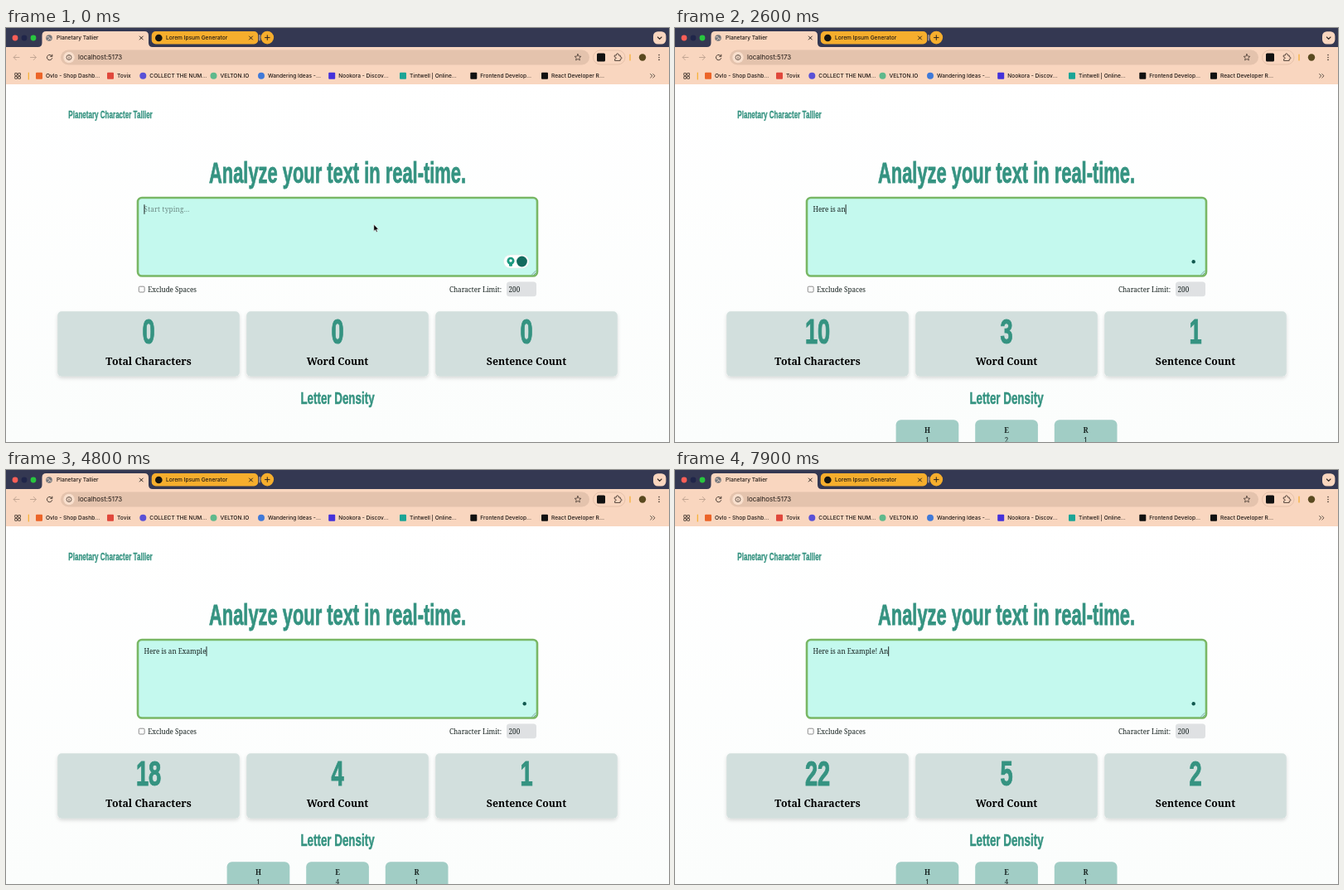
An HTML page for the animation above (8000 ms loop, 800x500 px).

```html
<!DOCTYPE html>
<html lang="en">
<head>
<meta charset="utf-8">
<title>Planetary Tallier</title>
<style>
html, body { margin: 0; width: 100%; height: 100%; overflow: hidden; background: #fff; }
svg { display: block; width: 800px; height: 500px; }
text { white-space: pre; }
.ui { font: 500 6.6px Inter, "Liberation Sans", sans-serif; fill: #1f1814; }
.url { font-size: 7.9px; font-weight: 400; }
.body { font: 8.1px "Noto Serif", "Liberation Serif", serif; fill: #16211f; }
.hint { fill: #6c8a84; letter-spacing: .25px; }
.label { font: 700 12.3px "Noto Serif", "Liberation Serif", serif; fill: #000; text-anchor: middle; }
.key { font: 700 8.6px "Noto Serif", "Liberation Serif", serif; fill: #16211f; text-anchor: middle; }
.display { font-family: "Liberation Sans", Arial, sans-serif; font-weight: 700; fill: #359381; }
.mid { text-anchor: middle; }
</style>
</head>
<body>
<svg id="stage" viewBox="0 0 800 500">
  <defs>
    <linearGradient id="page" x2="0" y2="1">
      <stop stop-color="#fff"/><stop offset="1" stop-color="#fbfdfc"/>
    </linearGradient>
    <filter id="shadow" x="-10%" y="-10%" width="120%" height="140%">
      <feDropShadow dx="0" dy="2.2" stdDeviation="2" flood-color="#000" flood-opacity=".14"/>
    </filter>
  </defs>
</svg>
<script>
const LOOP = 8000;
const stage = document.getElementById('stage');

function add(tag, attrs, parent = stage) {
  const el = document.createElementNS('http://www.w3.org/2000/svg', tag);
  for (const k in attrs) el.setAttribute(k, attrs[k]);
  parent.appendChild(el);
  return el;
}
const rect = (x, y, width, height, rx, fill, more, parent) =>
  add('rect', { x, y, width, height, rx, fill, ...more }, parent);
const dot = (cx, cy, r, fill, more, parent) => add('circle', { cx, cy, r, fill, ...more }, parent);
const line = (d, stroke, width = 1, parent) =>
  add('path', { d, stroke, 'stroke-width': width, fill: 'none', 'stroke-linecap': 'round', 'stroke-linejoin': 'round' }, parent);
function text(x, y, str, cls, parent) {
  const el = add('text', { x, y, class: cls }, parent);
  el.textContent = str;
  return el;
}
// Condensed display face
function display(x, y, size, str, cls = 'mid') {
  const el = add('text', {
    transform: `translate(${x} ${y}) scale(.64 1)`, class: 'display ' + cls,
    'font-size': size, stroke: '#359381', 'stroke-width': size / 40
  });
  el.textContent = str;
  return el;
}
const show = (el, on) => el.setAttribute('visibility', on ? 'visible' : 'hidden');

function drawTabs() {
  rect(0, 0, 800, 23, 0, '#343852');
  rect(0, 23, 800, 45, 0, '#f9d6bf');
  [[11, '#fe5f57'], [22, '#20264a'], [33, '#28c63f']].forEach(([x, c]) => dot(x, 12, 3.4, c));
  add('path', { d: 'M38.5 23Q43.5 23 43.5 18V9Q43.5 4 48.5 4H167Q172 4 172 9V18Q172 23 177 23Z', fill: '#f9d6bf' });
  rect(175.7, 4, 128.5, 15.5, 5, '#f6ae2d');
  line('M306 8.5V15', '#e6cfc2', 1);
  dot(315.3, 11.6, 7.8, '#f6ae2d');
  line('M312.5 11.6H318.1M315.3 8.8V14.4', '#2c2420', 1);
  dot(52, 12, 3.8, '#73757a');
  line('M49.5 10.8Q52 9.6 52.2 11.8T54.4 13.3M50.5 14.4L52 13', '#f1d9ca', .9);
  dot(184.3, 12, 4.3, '#16150f');
  text(61, 14.3, 'Planetary Tallier', 'ui');
  text(193, 14.3, 'Lorem Ipsum Generator', 'ui');
  [163.3, 295.5].forEach(x => line(`M${x - 2} 10l4 4m0-4l-4 4`, '#2c2420', 1));
  rect(781, 4.2, 15.4, 15.4, 5.5, '#f9d6bf');
  line('M786.4 11l2.3 2.3 2.3-2.3', '#2c2420', 1.1);
}

function drawToolbar() {
  const faint = '#c3a693', ink = '#4b3d34';
  line('M16 35.5H9.3M12.2 32.4L9.2 35.5l3 3.1', faint);
  line('M29.5 35.5H36.2M33.3 32.4l3 3.1-3 3.1', faint);
  line('M55.4 33.9A3.2 3.2 0 1 0 55.7 36.6M55.8 32.2V34.3H53.6', ink);
  rect(66, 26.5, 638, 18, 9, '#e4c3ad');
  dot(76, 35.5, 6.7, '#f9dfcd');
  dot(76, 35.5, 3, 'none', { stroke: ink, 'stroke-width': .8 });
  line('M76 35.3V37M76 33.8V33.9', ink, .8);
  text(87, 38.4, 'localhost:5173', 'ui url');

  let star = '';
  for (let i = 0; i < 10; i++) {
    const a = i * Math.PI / 5, r = i % 2 ? 1.9 : 4.1;
    star += (i ? 'L' : 'M') + (690 + r * Math.sin(a)).toFixed(2) + ' ' + (35.6 - r * Math.cos(a)).toFixed(2);
  }
  line(star + 'Z', ink, .8);

  rect(708.5, 27, 38.5, 17, 8.5, 'none', { stroke: '#e3bfa8', 'stroke-width': .9 });
  rect(713, 30.5, 10, 10, 1.5, '#111');
  line('M734.6 33H736.4Q736.2 30.8 737.8 30.8T739.3 33H741.2V35Q743 34.8 743 36.2T741.2 37.6V39.5H734.6V37.5Q736.2 37.3 736.2 36.2T734.6 35Z', ink, .9);
  line('M753 32V39', '#f6ae2d', 1.2);
  dot(768, 35.5, 4.2, '#5a4a20');
  [32.6, 35.5, 38.4].forEach(y => dot(788, y, .8, ink));
}

function drawBookmarks() {
  for (let i = 0; i < 4; i++)
    rect(10.7 + (i % 2) * 4, 54.5 + (i >> 1) * 4, 2.8, 2.8, .3, 'none', { stroke: '#3c312a', 'stroke-width': .8 });
  line('M27.3 54V62', '#f6ae2d', 1.2);
  [
    [40, '#ec6428', 'Ovlo - Shop Dashb...'],
    [126, '#e0473b', 'Tovix'],
    [165.3, '#5a51d6', 'COLLECT THE NUM...', 1],
    [250.5, '#5fb98c', 'VELTON.IO', 1],
    [308, '#3f79d8', 'Wandering Ideas -...', 1],
    [393.2, '#4431da', 'Nookora - Discov...'],
    [479, '#1ba596', 'Tintwell | Online...'],
    [564.3, '#111', 'Frontend Develop...'],
    [650, '#111', 'React Developer R...']
  ].forEach(([x, c, str, round]) => {
    rect(x - 4, 53.8, 8, 8, round ? 4 : 1, c);
    text(x + 8, 60.3, str, 'ui');
  });
  line('M777.6 55.6l2.2 2.2-2.2 2.2M780.8 55.6l2.2 2.2-2.2 2.2', '#4b3d34', .9);
}

function drawPage() {
  rect(0, 68, 800, 432, 0, 'url(#page)');
  display(75.3, 108.7, 12.6, 'Planetary Character Tallier', '');
  display(400, 187, 34.2, 'Analyze your text in real-time.');
  rect(159, 205, 482, 94.5, 5, '#c4f9ee', { stroke: '#79b765', 'stroke-width': 2.6 });
  line('M634.5 298l4.5-4.5M637 298l2-2', '#5e7d76', .7);
  rect(160.3, 312.2, 6.8, 6.8, 1.2, '#fff', { stroke: '#6f6f6f', 'stroke-width': .8 });
  text(171.3, 318.7, 'Exclude Spaces', 'body');
  text(535, 318.7, 'Character Limit:', 'body');
  rect(604, 306.5, 36, 17.8, 3.5, '#dfe1e3');
  text(606.6, 318.7, '200', 'body');
  display(400, 454, 20.9, 'Letter Density');
}

function statCard(cx, name) {
  rect(cx - 109.8, 342.3, 219.6, 78.5, 5, '#d2dfdd', { filter: 'url(#shadow)' });
  text(cx, 407, name, 'label');
  return display(cx, 381.2, 42.5, '0');
}

function letterCard(x, letter) {
  const g = add('g', {});
  rect(x, 473.3, 75.7, 50, 6, '#a1cdc5', {}, g);
  text(x + 37.8, 488.6, letter, 'key', g);
  return { g, letter, count: text(x + 37.8, 501, '', 'body mid', g) };
}

drawPage();
drawTabs();
drawToolbar();
drawBookmarks();
const stats = [[172, 'Total Characters'], [400, 'Word Count'], [628, 'Sentence Count']].map(a => statCard(...a));
const letters = [[266.6, 'H'], [362.2, 'E'], [457.8, 'R']].map(a => letterCard(...a));

const hint = text(166.5, 222, 'Start typing...', 'body hint');
const typed = text(166.5, 222, '', 'body');
const caret = rect(0, 213.2, .9, 11.6, 0, '#111');

const idleDot = dot(625.7, 282.3, 2.2, '#11594f');
const badge = add('g', {});
rect(600.5, 274, 30.5, 16, 8, '#fff', { stroke: '#dcebe7', 'stroke-width': .6 }, badge);
dot(609, 281.3, 4.5, '#1b9a80', {}, badge);
rect(607, 284.5, 4, 3.2, 1, '#1b9a80', {}, badge);
dot(609, 281, 1.7, '#fff', {}, badge);
dot(622.5, 282, 6.4, '#126b5e', {}, badge);

const pointer = add('path', {
  d: 'M443.8 237.2V245.4L445.7 243.7 446.9 246.5 448.3 245.9 447.1 243.2H449.6Z',
  fill: '#000', stroke: '#fff', 'stroke-width': .6
});

const MESSAGE = 'Here is an Example! An';
const KEYS = [700, 900, 1100, 1300, 1500, 1700, 1800, 2000, 2300, 2500, 2700,
  3800, 4000, 4200, 4300, 4500, 4600, 4700, 7000, 7200, 7600, 7800];
const ruler = document.createElement('canvas').getContext('2d');
ruler.font = '81px "Noto Serif", "Liberation Serif", serif';

function draw(t) {
  const n = KEYS.filter(k => k <= t).length;
  const str = MESSAGE.slice(0, n);
  const since = t - (n ? KEYS[n - 1] : 0);
  const words = str.split(' ').filter(Boolean).length;
  const sentences = str.split(/[.!?]/).filter(s => s.trim()).length;

  typed.textContent = str;
  show(hint, !n);
  show(pointer, !n);
  caret.setAttribute('x', 166.5 + ruler.measureText(str).width / 10);
  show(caret, since % 1000 < 500);
  [n, words, sentences].forEach((v, i) => stats[i].textContent = v);
  letters.forEach(({ g, letter, count }) => {
    const c = str.toUpperCase().split(letter).length - 1;
    count.textContent = c;
    show(g, c > 0);
  });

  const resting = !n || (t >= 5700 && t < 7000);
  show(badge, resting);
  show(idleDot, !resting);
}

function frame() {
  draw(Math.floor(performance.now() % LOOP / 100) * 100);
  requestAnimationFrame(frame);
}
frame();
</script>
</body>
</html>
```
